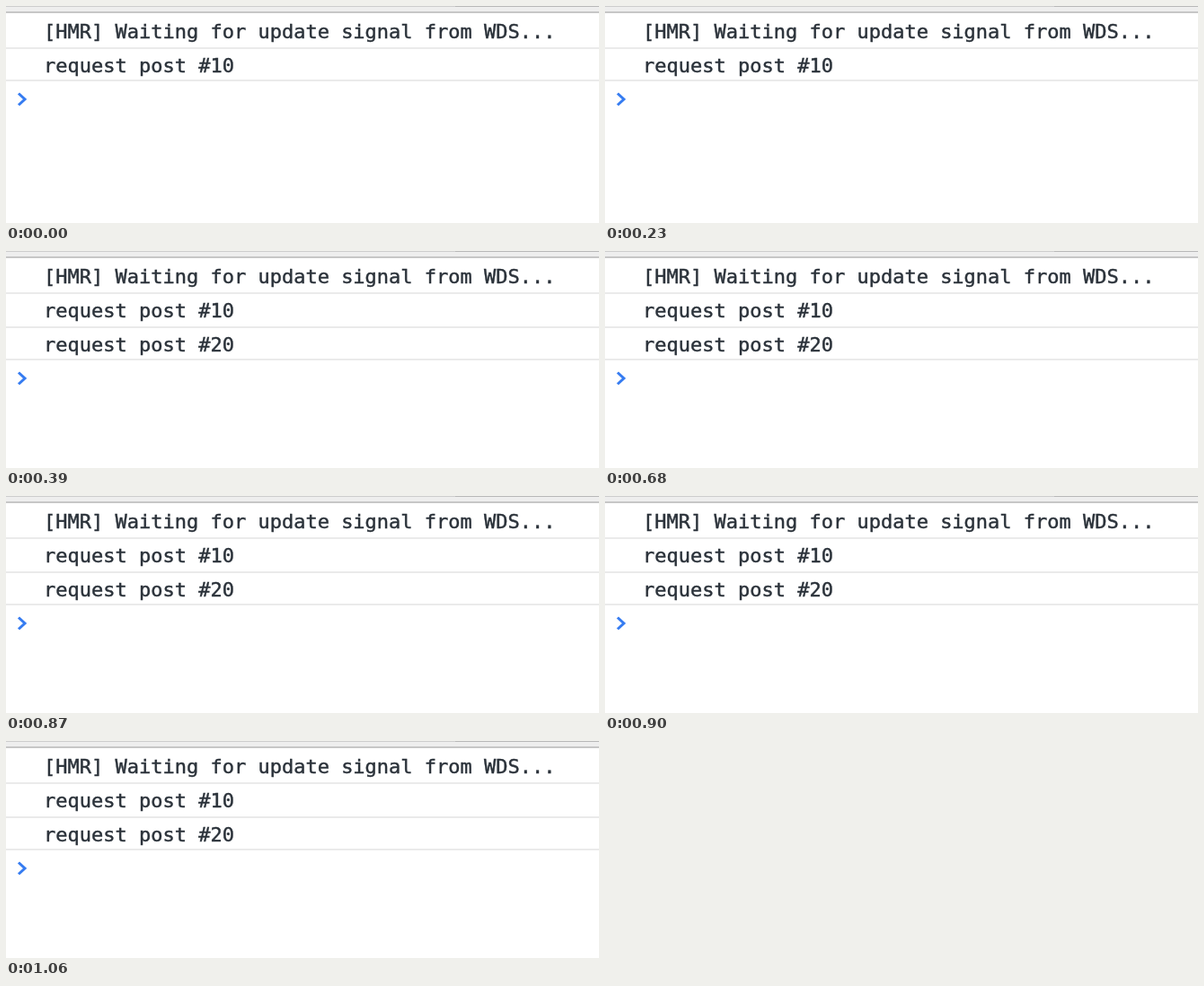
Animation, 660 px wide and 242 px high, one loop 1.17 s. Source, as an HTML page:

```html
<!DOCTYPE html>
<html lang="en">
<head>
<meta charset="utf-8">
<title>Console</title>
<style>
html, body { margin: 0; width: 100%; height: 100%; overflow: hidden; background: #fff; }
svg { display: block; }
text {
  font: 22px Menlo, "DejaVu Sans Mono", monospace;
  fill: #2b323a;
  stroke: #2b323a;
  stroke-width: 0.45;
  white-space: pre;
}
.rule { fill: #eaeaea; }
.prompt { fill: none; stroke: #367cf1; stroke-width: 3; }
</style>
</head>
<body>
<svg width="660" height="242" viewBox="0 0 660 242">
  <rect width="660" height="6" fill="#eeeeee"/>
  <rect width="500" height="1" fill="#cdcdcd"/>
  <rect x="500" width="160" height="1" fill="#b8b8b8"/>
  <rect y="6" width="660" height="2" fill="#c6c6c6"/>
  <text x="42" y="36">[HMR] Waiting for update signal from WDS...</text>
  <text x="42" y="74">request post #10</text>
  <text id="second" x="42" y="112">request post #20</text>
  <rect class="rule" y="46" width="660" height="2"/>
  <rect class="rule" id="inner" y="84" width="660" height="2"/>
  <g id="end">
    <rect class="rule" y="82" width="660" height="2"/>
    <path class="prompt" d="M14 97.5l7 6.5-7 6.5"/>
  </g>
</svg>
<script>
const LOOP = 1170, ARRIVAL = 390, ROW = 38;
const [second, inner, end] = ["second", "inner", "end"].map(id => document.getElementById(id));
const start = performance.now();

function draw(now) {
  const time = Math.max(0, now - start) % LOOP;
  const arrived = time >= ARRIVAL;
  for (const part of [second, inner]) {
    part.setAttribute("visibility", arrived ? "visible" : "hidden");
  }
  end.setAttribute("transform", `translate(0 ${arrived ? ROW : 0})`);
  requestAnimationFrame(draw);
}

draw(start);
</script>
</body>
</html>
```
